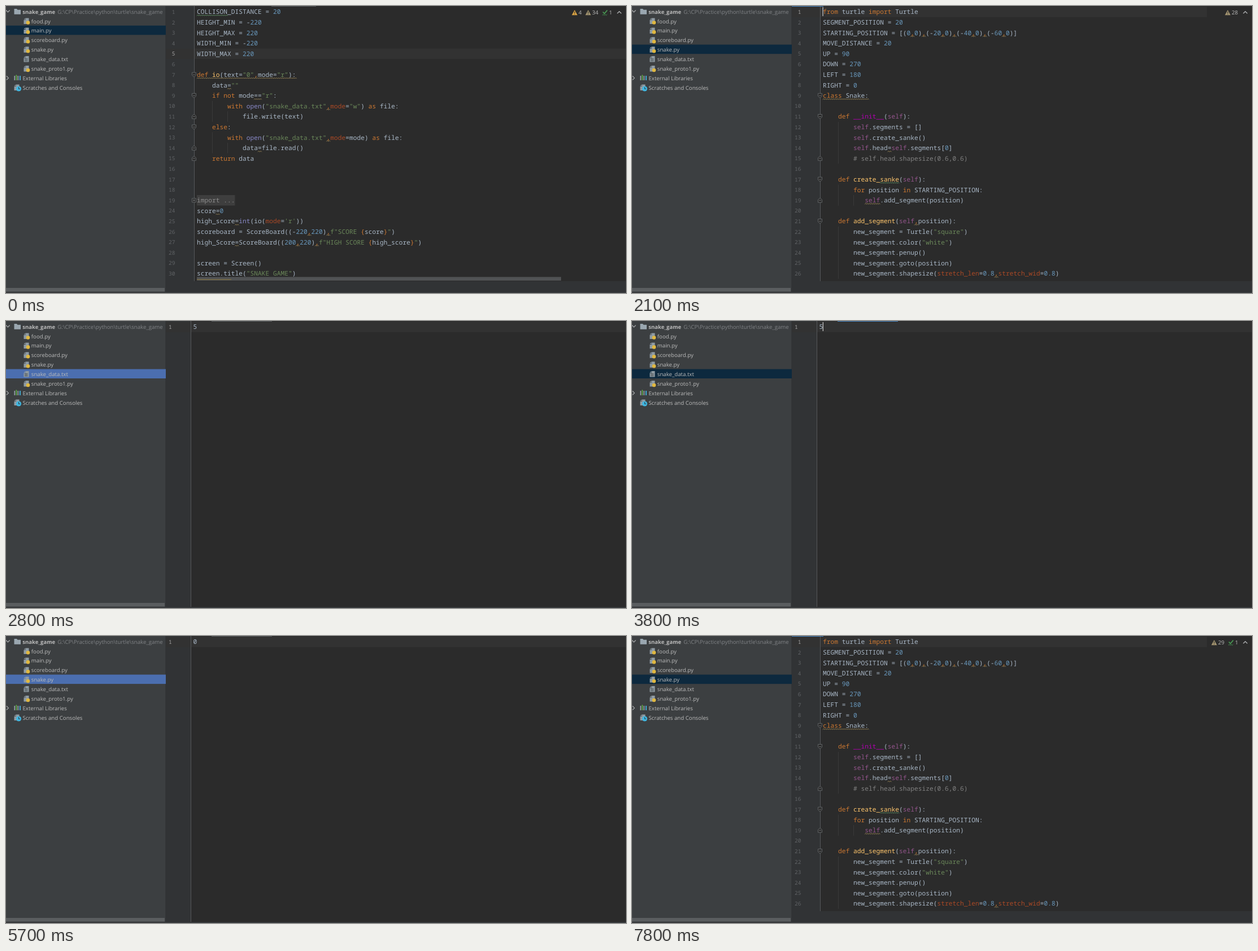
Write an HTML page that moves like this. It is 1098x510 px and loops after 8 s.

```html
<!DOCTYPE html>
<html lang="en">
<head>
<meta charset="utf-8">
<title>Code editor</title>
<style>
html, body { margin: 0; width: 100%; height: 100%; overflow: hidden; background: #2b2b2b; }
svg { display: block; }
text { white-space: pre; text-rendering: geometricPrecision; }
.code { font: 500 11.25px "Noto Sans Mono", monospace; }
.num { font: 9.5px "Noto Sans Mono", monospace; text-anchor: end; }
.ui { font: 9.67px "Open Sans", sans-serif; }
.bold { font-size: 9.47px; font-weight: 700; }
</style>
</head>
<body>
<svg id="stage" width="1098" height="510" viewBox="0 0 1098 510"></svg>
<style id="timing"></style>
<script>
const LOOP = 8000, CHAR = 6.75, LINE = 18.6, LEFT = 338;
const PLAIN = '#a9b7c6', WEAK = '#a08a58', TYPO = '#659c6b';
const FOCUS = '#4a88c7', IDLE = '#5b5e60';

const lineTop = i => 1.2 + i * LINE;
const baseline = i => 14.3 + i * LINE;
const rect = (x, y, w, h, fill) =>
  `<rect x="${x}" y="${y}" width="${w}" height="${h}" fill="${fill}"/>`;
const text = (x, y, s, fill, cls = 'ui') =>
  `<text x="${x}" y="${y}" fill="${fill}" class="${cls}">${s}</text>`;
const stroke = (d, color, width = 1) =>
  `<path d="${d}" fill="none" stroke="${color}" stroke-width="${width}"/>`;
const fill = (d, color) => `<path d="${d}" fill="${color}"/>`;

// Shows content only inside the given [start, end] spans of the loop.
const rules = [];
function during(spans, content) {
  const name = 'k' + rules.length;
  const pct = ms => (ms / LOOP * 100).toFixed(3) + '%';
  const steps = spans.map(([a, b]) =>
    `${pct(a)}{opacity:1}` + (b < LOOP ? `${pct(b)}{opacity:0}` : '')).join('');
  rules.push(`@keyframes ${name}{0%{opacity:0}${steps}${spans.at(-1)[1] === LOOP ? '100%{opacity:1}' : ''}}`);
  return `<g opacity="0" style="animation:${name} ${LOOP}ms step-end infinite">${content}</g>`;
}

const syntax = [
  ['#.*', '#808080'],
  ['f"[^{]*|"[^"]*"|\'[^\']*\'|"', '#6a8759'],
  ['__\\w+__', '#b200b2'],
  ['(?<=def )\\w+', '#ffc66d'],
  ['\\b(?:def|class|if|not|else|with|as|return|from|import|for|in)\\b|[,{}]', '#cc7832'],
  ['\\bself\\b', '#94558d'],
  ['\\b(?:open|int)\\b', '#8888c6'],
  ['(?<!def .*)(?<=[(,])\\w+(?==)', '#aa4926'],
  ['\\b\\d+(?:\\.\\d+)?', '#6897bb']
];
const lexer = new RegExp(syntax.map(s => `(${s[0]})`).join('|'), 'g');
const sloppy = /,|(?<=^ *[\w.]+)=(?=[^ =])|==/g;

function wave(line, col, len, color) {
  const n = Math.max(2, Math.round(len * CHAR / 3.4));
  return stroke(`M${LEFT + col * CHAR} ${baseline(line) + 3.2}` + 'l1.7-1.7 1.7 1.7'.repeat(n), color, 0.9);
}

function codeLine(src, i) {
  let spans = '', pos = 0, marks = '';
  const add = (s, col, color) => {
    if (s) spans += `<tspan x="${LEFT + col * CHAR}" fill="${color}">${s}</tspan>`;
  };
  // Leading spaces are trimmed into the column so every piece starts on the grid.
  const plain = (a, b) => {
    const s = src.slice(a, b), skip = s.length - s.trimStart().length;
    add(s.slice(skip), a + skip, PLAIN);
  };
  for (const m of src.matchAll(lexer)) {
    plain(pos, m.index);
    add(m[0], m.index, syntax[m.slice(1).findIndex(g => g !== undefined)][1]);
    pos = m.index + m[0].length;
  }
  plain(pos, src.length);
  if (/^(def|class)/.test(src)) marks = wave(i, 0, src.length, WEAK);
  else if (!src.includes('#'))
    for (const m of src.matchAll(sloppy)) marks += wave(i, m.index, m[0].length, WEAK);
  return `<text y="${baseline(i)}" class="code">${spans}</text>` + marks;
}

const caret = x => rect(x - 0.6, 2, 1.3, 16, '#c4c4c4');
const tab = (x, w, color) => rect(x, 0, w, 1, color);

function foldMark(i, kind) {
  const y = lineTop(i) + 9.3;
  const shape = kind === 'end' ? 'm0-4.2 3.5 3v5h-7v-5z' : kind === 'start' ? 'm-3.5-4h7v5l-3.5 3-3.5-3z' : 'm-3.5-3.5h7v7h-7z';
  return `<path d="M333 ${y}${shape}" fill="#2b2b2b" stroke="#66696b" stroke-width=".9"/>` +
    stroke(`M331.2 ${y}h3.6` + (kind === 'more' ? `M333 ${y - 1.8}v3.6` : ''), '#77797b', 0.9);
}
const folds = (starts, ends) =>
  starts.map(n => foldMark(n - 1, 'start')).join('') + ends.map(n => foldMark(n - 1, 'end')).join('');

// Indent guides: [column, first line, last line]
const guides = list => list.map(([col, a, b]) =>
  rect(LEFT + col * CHAR, lineTop(a - 1), 1, (b - a + 1) * LINE, '#3a3a3a')).join('');

function page(src, current, lineNo, bottom, gutter, numX) {
  return rect(283, 0, 815, bottom, '#2b2b2b') + rect(283, 0, gutter - 283, bottom, '#313335') +
    rect(283, lineTop(current), 815, LINE, '#323232') + rect(gutter, 0, 1, bottom, '#55585a') +
    src.map((_, i) =>
      text(numX, baseline(i) - 0.3, lineNo(i), i === current ? '#a4a3a3' : '#606366', 'num')).join('');
}
const footer = rect(283, 489, 815, 19, '#313335');

const triangle = (x, color) =>
  fill(`M${x + 5} 7l5 9.2h-10z`, color) + rect(x + 4.5, 9.8, 1.1, 3.2, '#2b2b2b') + rect(x + 4.5, 13.9, 1.1, 1.1, '#2b2b2b');
const tick = x => stroke(`M${x + 1} 10.5l2.8 3 5-6`, '#499c54', 1.8) +
  stroke(`M${x} 16.5l1.7-1.5 1.7 1.5 1.7-1.5 1.7 1.5 1.7-1.5`, '#499c54', 0.9);
const chevron = stroke('M1082.5 13.3l3.6-3.6 3.6 3.6', '#afb1b3', 1.3);
const count = (x, s) => text(x, 15.4, s, '#bbbbbb');
const weakCount = n => triangle(1026, '#a39470') + count(1038, n) + tick(1056) + count(1068, '1');

const mainSrc = `COLLISON_DISTANCE = 20
HEIGHT_MIN = -220
HEIGHT_MAX = 220
WIDTH_MIN = -220
WIDTH_MAX = 220

def io(text="0",mode="r"):
    data=""
    if not mode=="r":
        with open("snake_data.txt",mode="w") as file:
            file.write(text)
    else:
        with open("snake_data.txt",mode=mode) as file:
            data=file.read()
    return data




score=0
high_score=int(io(mode='r'))
scoreboard = ScoreBoard((-220,220),f"SCORE {score}")
high_Score=ScoreBoard((200,220),f"HIGH SCORE {high_score}")

screen = Screen()
screen.title("SNAKE GAME")`.split('\n');

const snakeSrc = `from turtle import Turtle
SEGMENT_POSITION = 20
STARTING_POSITION = [(0,0),(-20,0),(-40,0),(-60,0)]
MOVE_DISTANCE = 20
UP = 90
DOWN = 270
LEFT = 180
RIGHT = 0
class Snake:

    def __init__(self):
        self.segments = []
        self.create_sanke()
        self.head=self.segments[0]
        # self.head.shapesize(0.6,0.6)

    def create_sanke(self):
        for position in STARTING_POSITION:
           self.add_segment(position)

    def add_segment(self,position):
        new_segment = Turtle("square")
        new_segment.color("white")
        new_segment.penup()
        new_segment.goto(position)
        new_segment.shapesize(stretch_len=0.8,stretch_wid=0.8)`.split('\n');

function mainView() {
  return page(mainSrc, 4, i => i < 19 ? i + 1 : i + 5, 489, 333, 299.5) +
    guides([[4, 10, 11], [4, 13, 14], [8, 11, 11], [8, 14, 14]]) +
    rect(LEFT, lineTop(18), 67.5, LINE, '#3e3e3e') +
    text(LEFT, baseline(18), 'import ...', '#8c8c8c', 'code') +
    mainSrc.map(codeLine).join('') + wave(0, 0, 8, TYPO) +
    folds([7, 9, 12], [11, 14, 15]) + foldMark(18, 'more') +
    rect(338, 481.5, 645, 6.5, '#505254') + rect(338, 485, 61, 2, '#6e6547') +
    triangle(1002, '#d9a343') + count(1014, '4') + triangle(1026, '#a39470') + count(1038, '34') +
    tick(1056) + count(1068, '1') + chevron + tab(470, 79, IDLE) + footer;
}

function snakeView() {
  const marks = folds([9, 11, 17, 21], [15, 19]);
  return page(snakeSrc, 0, i => i + 1, 489, 333, 299.5) +
    guides([[4, 12, 15], [4, 18, 19], [4, 22, 26], [8, 19, 19]]) +
    snakeSrc.map(codeLine).join('') + wave(18, 11, 4, WEAK) +
    during([[2100, 2800], [5900, 8000]], wave(16, 15, 5, TYPO)) +
    marks + during([[6000, 6200]], rect(333, 156, 1, 332, '#626567') + marks) +
    rect(1018, 1, 80, 19, '#2b2b2b') + chevron +
    during([[1700, 2300]], triangle(1050, '#a39470') + count(1062, '28')) +
    during([[2300, 2800], [5900, 6000]], weakCount('28')) +
    during([[6000, 8000]], weakCount('29')) +
    during([[1700, 2600], [5900, 8000]], tab(283, 56, FOCUS)) +
    during([[2600, 2800]], tab(283, 56, IDLE)) +
    during([[1700, 2600], [5900, 6800], [7300, 7800]], caret(338)) + footer;
}

function dataView() {
  const value = s => text(331.6, baseline(0), s, PLAIN, 'code');
  return page([''], 0, () => 1, 508, 327, 293.8) +
    during([[4200, 4300]], rect(332, 2, 7, 16, '#214283')) +
    during([[2800, 4300]], value('5')) + during([[4500, 5900]], value('0')) +
    during([[2800, 2900], [5600, 5900]], tab(364, 107, IDLE)) +
    during([[2900, 5600]], tab(364, 107, FOCUS)) +
    during([[2900, 3300], [3800, 4200], [4500, 5200]], caret(338.3)) +
    during([[4300, 4500]], caret(332.4));
}

const sheet = (x, y) => fill(`M${x + 3.5} ${y}h6v10.5h-9v-7h3z`, '#8f9ba3') + fill(`M${x + 0.5} ${y + 2.7}l2.5-2.5v2.5z`, '#8f9ba3');

function sidebar() {
  const label = '#bbbbbb', dark = '#0d293e', blue = '#4b6eaf';
  const select = (i, color) => rect(0, 1 + 16.9 * i, 283, 16.5, color);
  const y = i => 13.6 + 16.9 * i;
  let out = rect(0, 0, 283, 510, '#3c3f41') + rect(282, 0, 1, 508, '#343638') +
    during([[0, 1400]], select(2, dark)) +
    during([[1400, 1600], [5600, 5900]], select(4, blue)) +
    during([[1600, 2600], [5900, 8000]], select(4, dark)) +
    during([[2600, 2900]], select(5, blue)) +
    during([[2900, 5600]], select(5, dark));

  out += stroke('M0 7.5l3.3 3.4 3.3-3.4M1 124.5l3.4 3.4-3.4 3.4', '#afb1b3', 1.1) +
    fill('M14.5 5h4.5l1.5 1.8h5.5v8h-11.5z', '#9aa7b0') +
    text(29.3, y(0), 'snake_game', label, 'ui bold') +
    text(91.3, y(0), 'G:\\CP\\Practice\\python\\turtle\\snake_game', '#808386');

  ['food.py', 'main.py', 'scoreboard.py', 'snake.py', 'snake_data.txt', 'snake_proto1.py'].forEach((name, k) => {
    const i = k + 1, top = y(i) - 9;
    out += sheet(31, top) + text(44.8, y(i), name, label);
    out += name.endsWith('.py')
      ? `<circle cx="39" cy="${top + 8}" r="3.3" fill="#e0b840"/>`
      : stroke(`M33 ${top + 4.5}h5.5m-5.5 2h5.5m-5.5 2h5.5`, '#3c3f41', 0.8);
  });

  out += rect(14.5, 124, 1.6, 8, '#9aa7b0') + rect(17.5, 122.5, 1.6, 9.5, '#62b543') +
    rect(20.5, 124, 1.6, 8, '#9aa7b0') + rect(24, 124, 1.8, 8, '#40b6e0') +
    text(29.5, y(7), 'External Libraries', label);
  out += sheet(14, 139.5) + '<circle cx="22.5" cy="147" r="4.6" fill="#40b6e0"/>' +
    stroke('M22.5 144v3.2h2.6', '#2b3f4a', 1.1) + text(29.5, y(8), 'Scratches and Consoles', label);

  return out + rect(0, 501, 281, 6.5, '#5a5d5f');
}

document.getElementById('stage').innerHTML =
  during([[0, 1600]], mainView()) +
  during([[1600, 2800], [5900, 8000]], snakeView()) +
  during([[2800, 5900]], dataView()) +
  sidebar() +
  rect(0, 508, 1098, 1, '#2f3133') + rect(0, 509, 1098, 1, '#3c3f41');
document.getElementById('timing').textContent = rules.join('\n');
</script>
</body>
</html>
```
